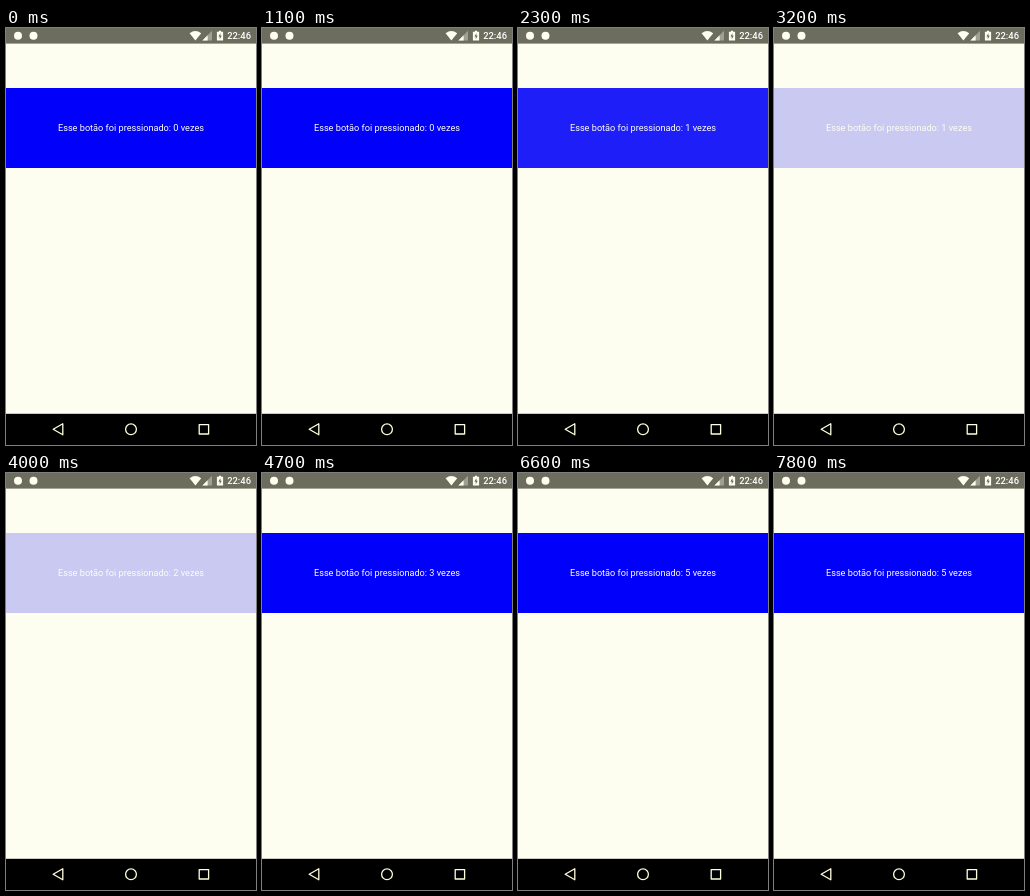
Animation of 250 by 417 pixels, one loop 8000 ms. Source, as an HTML page:

```html
<!DOCTYPE html>
<html lang="pt">
<head>
<meta charset="utf-8">
<title>Botão</title>
<style>
  html, body { margin: 0; width: 100%; height: 100%; overflow: hidden; background: #fdfdf0; }
  svg { display: block; width: 100%; height: 100%; }
  text { font-family: Roboto, Arial, sans-serif; font-size: 9.16px; fill: #fff; }
</style>
</head>
<body>
<svg viewBox="0 0 250 417">
  <rect width="250" height="417" fill="#fdfdf0"/>

  <!-- Status bar -->
  <rect width="250" height="15.6" fill="#6d6d5e"/>
  <g fill="#fffff0">
    <circle cx="12" cy="7.8" r="4"/>
    <circle cx="27.5" cy="7.8" r="4"/>
    <path d="M183.6 5.2Q189.4 .8 195.2 5.2L189.4 12.4Z"/>
    <path d="M206 2.8V12.4H196.4Z" opacity=".35"/>
    <path d="M201.6 7.2V12.4H196.4Z"/>
    <path d="M212.9 2.8H215.1V3.8H217.1V12.6H210.9V3.8H212.9Z"/>
    <text x="245" y="11.3" text-anchor="end" font-weight="500" style="font-size:9.4px">22:46</text>
  </g>
  <path d="M214.5 5.2L212.3 8.6H213.7V11.2L215.8 7.8H214.5Z" fill="#6d6d5e"/>

  <!-- Button -->
  <g id="button">
    <rect y="60" width="250" height="80" fill="#0000fb"/>
    <text id="label" x="125" y="103.3" text-anchor="middle"></text>
  </g>

  <!-- Navigation bar -->
  <rect y="385.8" width="250" height="31.2" fill="#000"/>
  <g fill="none" stroke="#ffffdc" stroke-width="1.3" stroke-linejoin="round">
    <path d="M47.2 401.3L56.8 395.8V406.8Z"/>
    <circle cx="125" cy="401.3" r="5.4"/>
    <rect x="193.2" y="396.6" width="9.4" height="9.4"/>
  </g>
</svg>
<script>
  const LOOP = 8000, FADE_IN = 150, FADE_OUT = 250, DIM = 0.2;
  // Touch down and release times in ms
  const presses = [[1790, 2120], [2960, 3260], [3840, 4190], [4760, 5060], [5840, 6040]];
  const button = document.getElementById('button');
  const label = document.getElementById('label');

  function ease(t) {
    t = Math.min(1, Math.max(0, t));
    return t < 0.5 ? 2 * t * t : 1 - 2 * (1 - t) * (1 - t);
  }

  function draw(time) {
    let count = 0, depth = 0;
    for (const [down, up] of presses) {
      if (time >= up) count++;
      depth += ease((time - down) / FADE_IN) - ease((time - up) / FADE_OUT);
    }
    button.setAttribute('opacity', 1 - (1 - DIM) * depth);
    label.textContent = `Esse botão foi pressionado: ${count} vezes`;
  }

  function tick() {
    draw(performance.now() % LOOP);
    requestAnimationFrame(tick);
  }
  tick();
</script>
</body>
</html>
```
